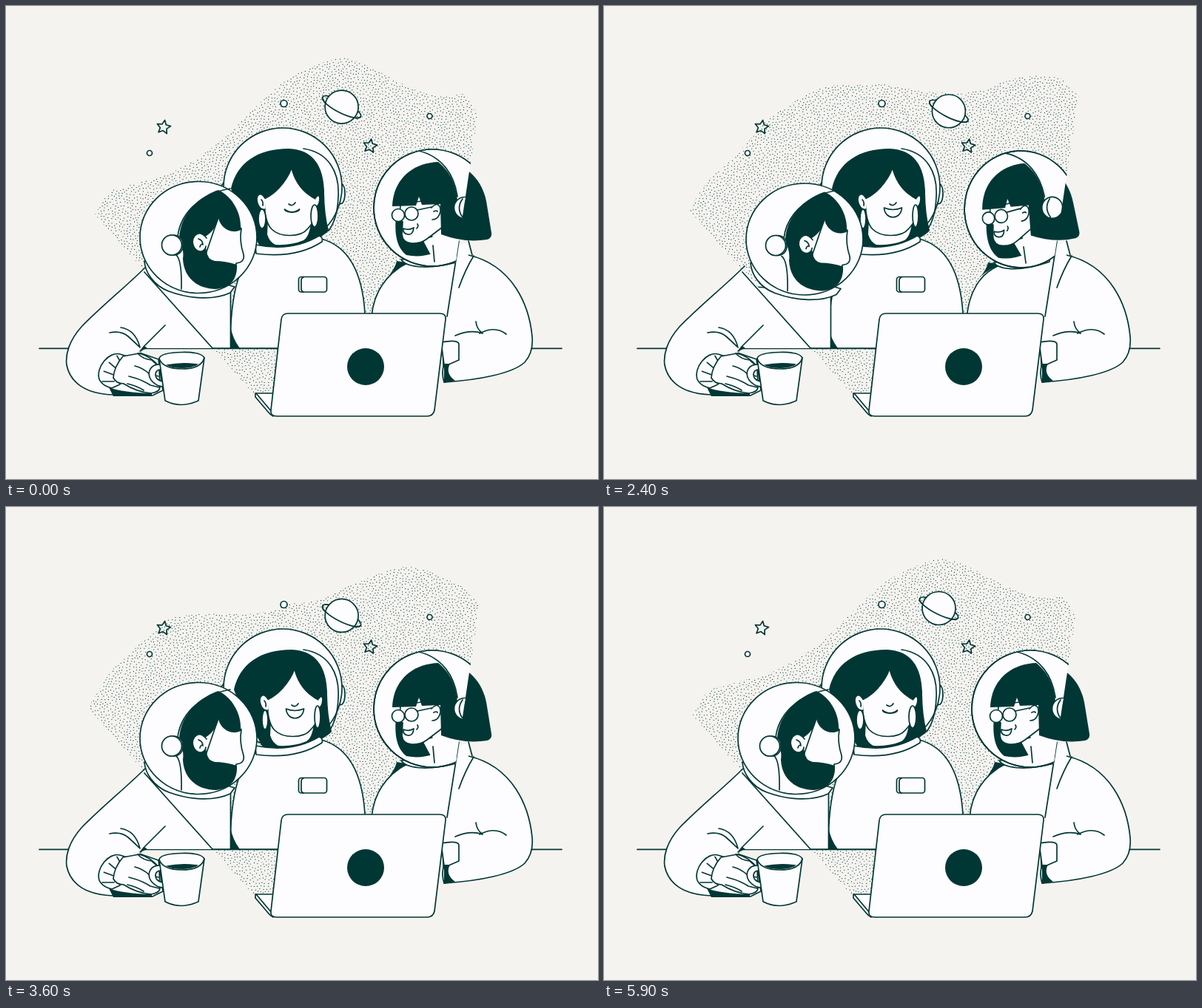
Animation of 800x640 px, one loop 6000 ms. Source, as an HTML page:

```html
<!DOCTYPE html>
<html lang="en">
<head>
<meta charset="utf-8">
<title>Astronauts at a laptop</title>
<style>
  html, body { margin: 0; height: 100%; overflow: hidden; background: #f5f3ef; }
  svg { display: block; width: 800px; height: 640px; }
  svg * { stroke-linecap: round; stroke-linejoin: round; }
  .art { stroke: #003734; stroke-width: 1.7; fill: #fdfcff; }
  .line { fill: none; }
  .dark { fill: #003734; }
  .bare { stroke: none; }
</style>
</head>
<body>
<svg viewBox="0 0 800 640">
  <defs>
    <pattern id="stipple" width="120" height="120" patternUnits="userSpaceOnUse">
      <path id="dots" fill="none" stroke="#003734" stroke-width="1.25"/>
    </pattern>
    <clipPath id="leftOfEdge"><path d="M400 100H644.6L590 464H400Z"/></clipPath>
  </defs>

  <path id="blob" fill="url(#stipple)"/>

  <g class="art">
    <path class="line" d="M45 463.3H751"/>
    <g id="sky"></g>
    <g id="planet">
      <ellipse class="line" rx="29" ry="8" transform="rotate(27)"/>
      <circle r="22.5"/>
      <path class="line" d="M-29 0A29 8 0 0 0 29 0" transform="rotate(27)"/>
    </g>

    <!-- Middle astronaut -->
    <path d="M340 330C318 345 303 380 303 463H500L485 416C482 366 466 326 426 315Z"/>
    <path class="dark bare" d="M303 432Q306 450 316 463H303Z"/>
    <rect x="395.5" y="366.5" width="38" height="20.5" rx="3.5"/>
    <path class="line" d="M402 367Q399 368 399 371V383Q399 386 402 387"/>
    <path d="M294 248l-5-2 6-8 7 2zM452 240q6 2 6 13t-4 14l-3 1z"/>
    <circle cx="374" cy="245" r="80"/>
    <g id="midHead">
      <path class="dark bare" d="M304 247C312 212 340 193 382 193C416 194 429 218 430 250Q430 280 436 304C425 316 400 324 372 325H343C330 300 312 270 304 247Z"/>
      <path class="bare" d="M354 290L353 309Q356 319 364 323Q386 324 402 317Q410 312 412 293Z"/>
      <path d="M386 219C378 240 362 255 349 261Q349 292 359 302C370 313 398 314 408 301Q421 288 420 262C404 254 391 240 386 219Z"/>
      <path d="M350 260q-6-9-10-3c-3 7 2 20 10 18M418 260q5-7 6 0q0 9-5 12"/>
      <path class="line" d="M345 262q3 3 2 8M382 268q5 4 9-2"/>
      <ellipse class="ring" cx="346" cy="288" ry="13"/>
      <ellipse class="ring" cx="417" cy="284" ry="15"/>
      <path id="smile"/>
    </g>
    <path class="line" d="M402 193C436 198 451 225 449 258Q448 288 436 304"/>
    <path d="M337 323Q386 333 423 311Q429 313 427 319Q392 342 338 335Z"/>

    <!-- Left astronaut -->
    <path id="manBody"/>
    <path id="folds" class="line" d="M252 416Q252 426 249 430M250 440Q245 452 234 462" pathLength="1"/>
    <path d="M190 352C163 379 128 407 102 434C85 453 80 472 82 486C87 510 108 525 145 526L198 527L212 520L206 478L180 469"/>
    <path class="bare" d="M189 358L279 463H184L180 470L150 455Z"/>
    <path class="line" d="M187 360L279 463M215 432L186 461L182 467"/>
    <path class="dark bare" d="M187 460L179 468L191 463ZM139 516Q158 523 197 524V528H145Z"/>
    <path class="line" d="M140 442Q156 439 165 447T181 462Q175 438 155 435"/>
    <path d="M154 471C139 467 121 489 126 505Q130 514 143 517L154 512L167 475Z"/>
    <path id="ribs"/>
    <path d="M158 474Q146 488 145 503Q149 511 159 511Q176 522 196 524Q208 522 208 516L207 488Q196 474 180 470Z"/>
    <path class="line" d="M174 487Q184 489 194 498L206 501M166 501Q183 505 195 513L207 516M164 511Q177 514 186 520M178 470Q185 478 197 479L208 489"/>
    <path d="M211 485C194 483 190 497 196 506Q204 516 215 515L213 508Q202 507 202 498Q203 491 212 492"/>
    <path d="M207 477L215 534Q236 545 260 534L268 476Q264 468 238 468.500Q209 469 207 477Z"/>
    <path class="line" d="M207 477Q212 491 238 491T268 476"/>
    <path class="dark bare" d="M216 485.500Q238 481 260 484.500Q252 490 238 490T216 485.500Z"/>
    <g id="manHead">
      <path d="M187 345C188 360 199 378 220 386C250 397 282 398 303 388L309 380Z"/>
      <ellipse cx="260" cy="313" rx="79" ry="75.5"/>
      <path class="line" d="M303 247C257 255 235 285 232 312M229 336Q238 342 237 383"/>
      <path d="M287 286L318 301Q315 318 321 336Q323 347 311 348L309 363L265 350Z"/>
      <path class="dark bare" d="M287 249C262 257 234 282 234 316Q241 330 239 342C240 363 253 382 284 383C304 381 313 369 312 350Q296 345 282 345Q272 343 271 331L266 314Q284 304 287 287C290 301 305 309 317 303C319 280 305 257 287 249Z"/>
      <path d="M271 314q-8-10-15-4c-8 8-2 23 8 22q6-2 6-7"/>
      <path class="line" d="M260 315q6 2 6 8M266 322q-3 0-4 4"/>
      <g id="manCup"><rect x="212" y="310" width="27" height="27" rx="12"/><circle cx="224" cy="323.5" r="13.5"/></g>
    </g>

    <!-- Right astronaut -->
    <path id="herBody"/>
    <path id="collarShade" class="dark bare" d="M528 345L546 348Q530 353 518 364Q526 354 528 345Z"/>
    <path class="bare" d="M610 325L625 318V345L598 412Z"/>
    <path d="M592 509Q588 496 592 485L588 455Q610 451 612 457V479L596 486"/>
    <path class="dark bare" d="M592 484H600Q593 497 607 507L592 510Z"/>
    <path class="line" d="M632 338Q620 358 612 381M612 318L596 420M625 318L630 337M607 446Q628 437 644 443Q636 437 635 427M640 443Q661 432 676 444"/>
    <g clip-path="url(#leftOfEdge)"><g class="herHead">
      <path d="M534 343C540 352 565 359 612 346L614 338Z"/>
      <circle cx="576" cy="273" r="79"/>
    </g></g>
    <g class="herHead">
      <path class="dark bare" d="M527 285C524 315 531 329 541 337Q560 341 579 334L575 300Z"/>
      <path class="bare" d="M563 316L579 346L606 343L604 306Z"/>
      <path d="M533 268L532 288L536 292L535 309Q536 320 548 321T569 315L594 296L590 260Z"/>
      <path class="dark bare" d="M522 271C523 238 546 212 585 211C619 211 645 232 650 270L656 307Q657 314 650 316Q620 321 588 309L587 268L562 269L558 258L554 270Z"/>
      <path d="M575 273q7-8 11-2c3 7-1 18-10 18"/>
      <path class="line" d="M577 324L579 346M578 278q4-2 5 0M556 295q2 3-1 6M556 276L575 272"/>
      <circle cx="530" cy="283" r="8.5"/><circle cx="548" cy="281" r="9"/>
      <path d="M537 301Q545 304 551 300Q550 310 543 309T537 301Z"/>
    </g>
    <g clip-path="url(#leftOfEdge)"><g class="herHead">
      <path class="bare" d="M572 203Q607 222 610 264L655 273A79 79 0 0 0 572 194Z"/>
      <path class="line" d="M558 196C590 204 606 229 610 258"/>
      <circle cx="620" cy="273" r="14.5"/>
      <path class="line" d="M617 261Q608 273 617 286"/>
      <circle class="line" cx="576" cy="273" r="79"/>
    </g></g>

    <!-- Laptop -->
    <path d="M337 524H361V555Q357 553 354 549L337 529Z"/>
    <path class="line" d="M338 524L359 549"/>
    <path d="M381 416H586Q595 416 594 424L579 547Q577 555 569 555H366Q357 555 358 547L372 424Q373 416 381 416Z"/>
    <circle class="dark bare" cx="486" cy="488" r="25"/>
  </g>
</svg>

<script>
const LOOP = 6000, STEP = 100, TILE = 120;
const $ = id => document.getElementById(id);
const set = (id, name, value) => $(id).setAttribute(name, value);
const setAll = (selector, name, value) =>
  document.querySelectorAll(selector).forEach(e => e.setAttribute(name, value));
const move = (id, x, y) => set(id, "transform", `translate(${x} ${y})`);
const lerp = (a, b, k) => a + (b - a) * k;

const ease = (t, from, to) => {
  const k = Math.min(1, Math.max(0, (t - from) / (to - from)));
  return k * k * (3 - 2 * k);
};
const hold = (t, in0, in1, out0, out1) => ease(t, in0, in1) - ease(t, out0, out1);
const wave = (t, peak) => Math.cos((t - peak) / LOOP * 2 * Math.PI);

// Smooth curve through a list of points.
function curve(pts) {
  let d = `M${pts[0]}`;
  for (let i = 0; i < pts.length - 1; i++) {
    const p = pts[i], q = pts[i + 1], o = pts[i - 1] || p, r = pts[i + 2] || q;
    d += `C${[0, 1].map(c => p[c] + (q[c] - o[c]) / 6)} ${[0, 1].map(c => q[c] - (r[c] - p[c]) / 6)} ${q}`;
  }
  return d;
}

// Upper and lower bounds of the cloud, every 80 px; a crest runs leftwards between them.
const HIGH = [225, 145, 108, 86, 69, 78, 100], LOW = [255, 227, 188, 134, 118, 119, 124];
const along = (list, u) => lerp(list[u | 0], list[(u | 0) + 1] ?? list[u | 0], u % 1);

function cloud(t) {
  const tip = 116 + 5 * wave(t, 600), end = 136 - 14 * wave(t, 2400);
  const pts = [[tip, 280 + (tip - 118) * 1.13]];
  for (let run = 0; run <= 480; run += 20) {
    const peak = 9700 - 6.5 * run - .0188 * run * run;
    const k = .5 + .5 * wave(t, peak);
    pts.push([140 + run, lerp(along(LOW, run / 80), along(HIGH, run / 80), k)]);
  }
  pts.push([641 - (end - 124) * .15, end]);
  return curve(pts) + "L590 464L580 537H345Z";
}

// Evenly scattered dots on a tile that wraps around.
function stipple() {
  let seed = 7;
  const random = () => (seed = seed * 16807 % 2147483647) / 2147483647;
  const wrap = d => Math.min(Math.abs(d), TILE - Math.abs(d));
  const dots = [];
  for (let i = 0; i < 12000; i++) {
    const x = random() * TILE, y = random() * TILE;
    if (dots.every(([u, v]) => Math.hypot(wrap(x - u), wrap(y - v)) > 3.4)) dots.push([x, y]);
  }
  return dots.map(([x, y]) => `M${x.toFixed(1)} ${y.toFixed(1)}h.01`).join("");
}

const polar = (cx, cy, r, a) => `${cx + r * Math.cos(a)},${cy + r * Math.sin(a)}`;
const star = (cx, cy) => `<polygon class="line" points="${
  Array.from({ length: 10 }, (_, i) => polar(cx, cy, i % 2 ? 4.6 : 9.7, i * Math.PI / 5 - 1.4)).join(" ")}"/>`;
const moon = (x, y, r) => `<circle cx="${x}" cy="${y}" r="${r}"/>`;

function smile(k) {
  const w = lerp(10, 12, k), top = lerp(8, 5, k), bottom = lerp(5, 17, k);
  return `M${-w} 0Q0 ${top} ${w} 0C${w * .9} ${bottom} ${-w * .9} ${bottom} ${-w} 0Z`;
}

function draw(t) {
  const her = hold(t, 50, 750, 2500, 3250);
  const man = hold(t, 800, 1500, 2500, 3350);
  const mid = hold(t, 850, 1500, 5000, 5700);
  const grin = hold(t, 300, 1400, 5000, 5700);
  const fold = hold(t, 200, 800, 900, 1450) + .4 * hold(t, 3800, 4200, 4400, 4900);

  set("blob", "d", cloud(t));
  move("planet", 457 + 11 * wave(t, 1800), 141 - 6 * wave(t, 700));

  move("midHead", 4 * mid, 0);
  setAll(".ring", "rx", 5 - mid);
  set("smile", "d", smile(grin));
  move("smile", 386.5, 275 - 2 * grin);

  set("manBody", "d", `M200 380L183 463H${303.5 + 3 * man}V385Z`);
  move("manHead", 11 * man, 2.5 * man);
  move("manCup", -3 * man, -2 * man);
  set("folds", "stroke-dasharray", `${fold / 2} 1`);
  set("folds", "visibility", fold > .02 ? "visible" : "hidden");

  const x = -11 * her;
  set("herBody", "d", `M${543 + x} ${347 + 5 * her}C${513 + x / 2} 363 ${497 + x / 3} 388 ${494 + x / 3} 420` +
    "L590 460L592 509C640 506 685 497 701 482Q713 469 711 447C707 405 685 351 625 337Z");
  move("collarShade", -9 * her, 2 * her);
  setAll(".herHead", "transform", `translate(${7.5 * her} ${her}) rotate(${-3 * her} 576 273) scale(${1 - .035 * her} 1)`);
}

set("dots", "d", stipple());
set("ribs", "d", [180, 200, 220, 240].map(deg => {
  const a = deg * Math.PI / 180;
  return `M${polar(170, 508, 40, a)}L${polar(170, 508, 24, a)}`;
}).join(""));
$("sky").innerHTML = star(213, 164) + star(492, 189.5) +
  moon(375.5, 132, 4.5) + moon(572.5, 149, 3.5) + moon(194, 199, 3.5);

// The motion advances in steps of a tenth of a second.
function tick() {
  draw(Math.floor(performance.now() % LOOP / STEP) * STEP);
  requestAnimationFrame(tick);
}
tick();
</script>
</body>
</html>
```
